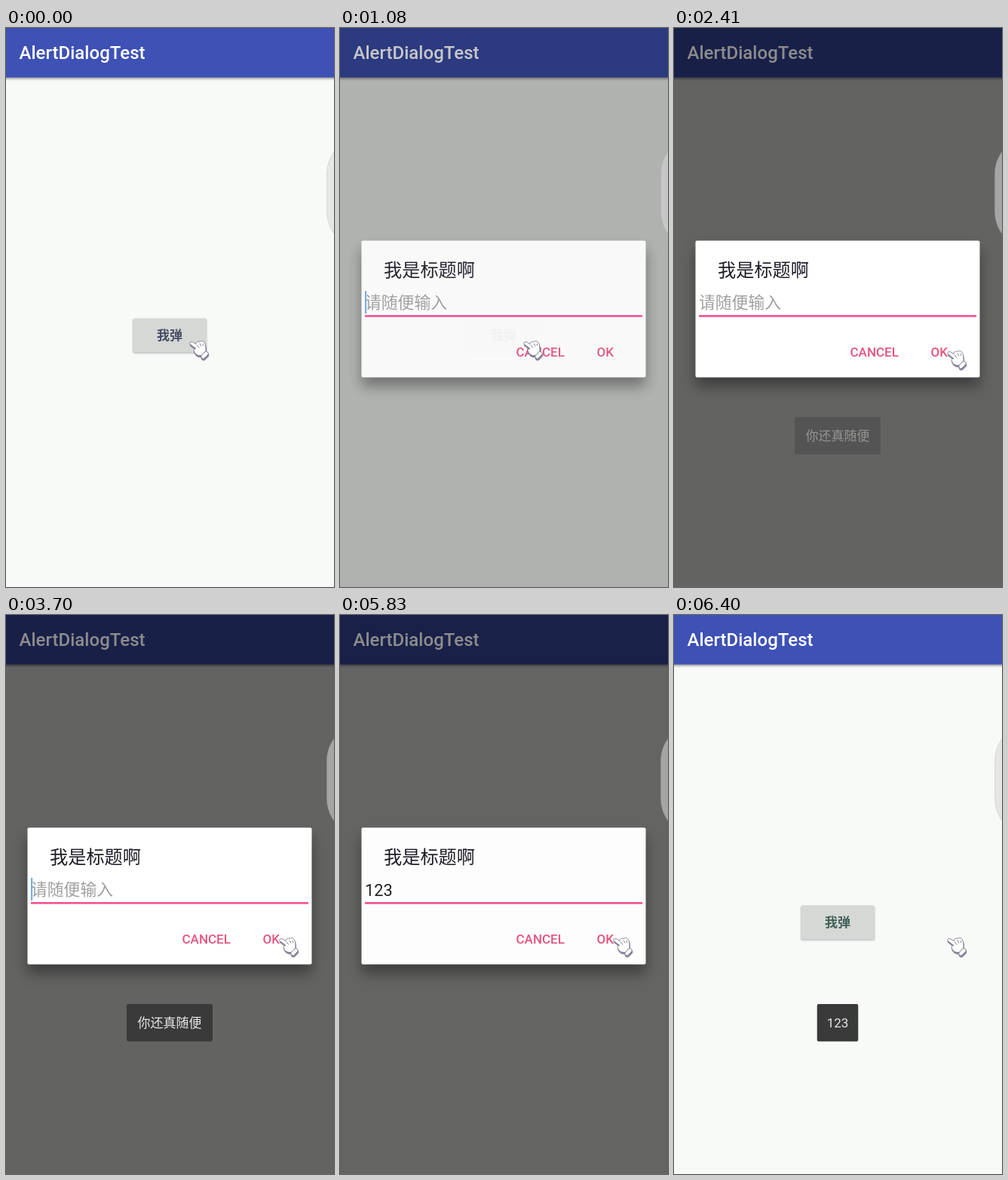
These frames come from a looping animation (435 px wide and 740 px high, 7260 ms). An HTML page:

```html
<!DOCTYPE html>
<html lang="zh">
<head>
<meta charset="utf-8">
<title>AlertDialogTest</title>
<style>
  html, body { margin: 0; width: 100%; height: 100%; overflow: hidden; background: #f8faf7; }
  svg { display: block; width: 100%; height: 100%; }
  text { font-family: Roboto, "Noto Sans CJK SC", "Noto Sans CJK", sans-serif; white-space: pre; }
  .medium { font-weight: 500; }
  .action { font-size: 17px; fill: #e4557f; }
  #bar { fill: #3e51b4; filter: drop-shadow(0 2px 1.5px rgba(0, 0, 0, .35)); }
  #button { fill: #d6d8d5; filter: drop-shadow(0 1.5px 1px rgba(60, 60, 80, .4)); }
  #panel { fill: #fff; filter: drop-shadow(0 12px 9px rgba(0, 0, 0, .38)); }
  #toast rect { fill: #3a3a3a; }
  #toast text { font-size: 17px; fill: #e6e6e6; text-anchor: middle; }
</style>
</head>
<body>
<svg viewBox="0 0 435 740">
  <rect width="435" height="740" fill="#f8faf7"/>
  <rect id="bar" x="-5" y="-5" width="445" height="70.5"/>
  <rect id="button" x="168.5" y="384.5" width="97.5" height="45" rx="2"/>
  <text id="label" x="217" y="413" font-size="17" font-weight="700" text-anchor="middle">我弹</text>
  <rect id="dim" width="435" height="740"/>
  <text id="title" class="medium" x="17.5" y="41" font-size="24">AlertDialogTest</text>
  <rect x="425.5" y="143" width="120" height="150" rx="50" fill="#d8d8d8" fill-opacity=".56"
        stroke="#aaa" stroke-opacity=".3"/>

  <g id="dialog">
    <rect id="panel" x="28.5" y="281.5" width="377" height="181" rx="2"/>
    <text x="58" y="329" font-size="24.2" fill="#1c1c26">我是标题啊</text>
    <text id="input" x="33" font-size="21.8"></text>
    <rect x="33" y="380" width="368" height="2.6" fill="#f4508d"/>
    <rect id="caret" y="348" width="2.2" height="30" fill="#78b0de"/>
    <text class="action medium" x="233.5" y="435">CANCEL</text>
    <text class="action medium" x="340.5" y="435">OK</text>
  </g>

  <g id="toast">
    <rect y="515" height="49.5" rx="2"/>
    <text x="217" y="546"></text>
  </g>

  <defs>
    <g id="hand" stroke-linejoin="round">
      <path d="M1 5C0 2 3 1 6 3L9 5C9 2 12 1 14 2C16 0 19 1 20 3C22 5 22 9 22 14L17 20C11 21 7 18 6 13C7 11 8 11 9 11Z"/>
      <rect x="-5.5" y="-2.7" width="11" height="5.4" rx="2.6" transform="translate(20.5 19.5) rotate(-45)"/>
    </g>
  </defs>
  <g id="pointer">
    <use href="#hand" x=".5" y="2.2" fill="#6d6b84" stroke="#6d6b84" opacity=".8"/>
    <use href="#hand" fill="#fff" stroke="#77778a" stroke-width=".9"/>
    <path d="M10 6L13 10M14 4L16 8M18 4.5L19 7.5" fill="none" stroke="#77778a" stroke-width=".9"/>
  </g>
</svg>
<script>
const LOOP = 7260;
const el = id => document.getElementById(id);
const [bar, label, dim, title, dialog, input, caret, toast, pointer] =
  ["bar", "label", "dim", "title", "dialog", "input", "caret", "toast", "pointer"].map(el);
const [toastBox, toastText] = toast.children;

const progress = (t, start, length) => Math.min(1, Math.max(0, (t - start) / length));
const decelerate = p => 1 - (1 - p) ** 2;
const smooth = p => p * p * (3 - 2 * p);
const set = (node, attributes) => {
  for (const name in attributes) node.setAttribute(name, attributes[name]);
};

const keyTimes = [4030, 4450, 4880];
const caretOff = [[2320, 2810], [3320, 3700], [5370, LOOP]];

function render(t) {
  const shade = 0.6 * (progress(t, 970, 230) - progress(t, 5830, 200));
  const grey = 255 * (1 - 0.75 * shade);
  set(dim, { opacity: shade });
  set(title, { fill: `rgb(${grey},${grey},${grey})` });
  set(label, { fill: t < 3000 ? "#474d66" : "#42605a" });

  const shown = decelerate(progress(t, 970, 150)) - progress(t, 5830, 140);
  set(dialog, { opacity: shown });

  const typed = "123".slice(0, keyTimes.filter(k => t >= k).length);
  input.textContent = typed || "请随便输入";
  set(input, { y: typed ? 372 : 371, fill: typed ? "#222226" : "#a0a0a0" });
  const blinkedOff = caretOff.some(([from, to]) => t >= from && t < to);
  set(caret, { x: 33 + 12.2 * typed.length, opacity: blinkedOff ? 0 : 1 });

  const second = t >= 5000;
  const width = second ? 54.5 : 114;
  toastText.textContent = second ? "123" : "你还真随便";
  set(toastBox, { x: 217 - width / 2, width });
  set(toast, {
    opacity: second
      ? decelerate(progress(t, 5885, 500))
      : decelerate(progress(t, 2310, 500)) - progress(t, 4170, 500) ** 2
  });

  const move = smooth(progress(t, 1126, 544));
  set(pointer, { transform: `translate(${243 + 119 * move} ${413.5 + 13 * move})` });
}

const began = performance.now();
function tick() {
  render((performance.now() - began) % LOOP);
  requestAnimationFrame(tick);
}
tick();
</script>
</body>
</html>
```
